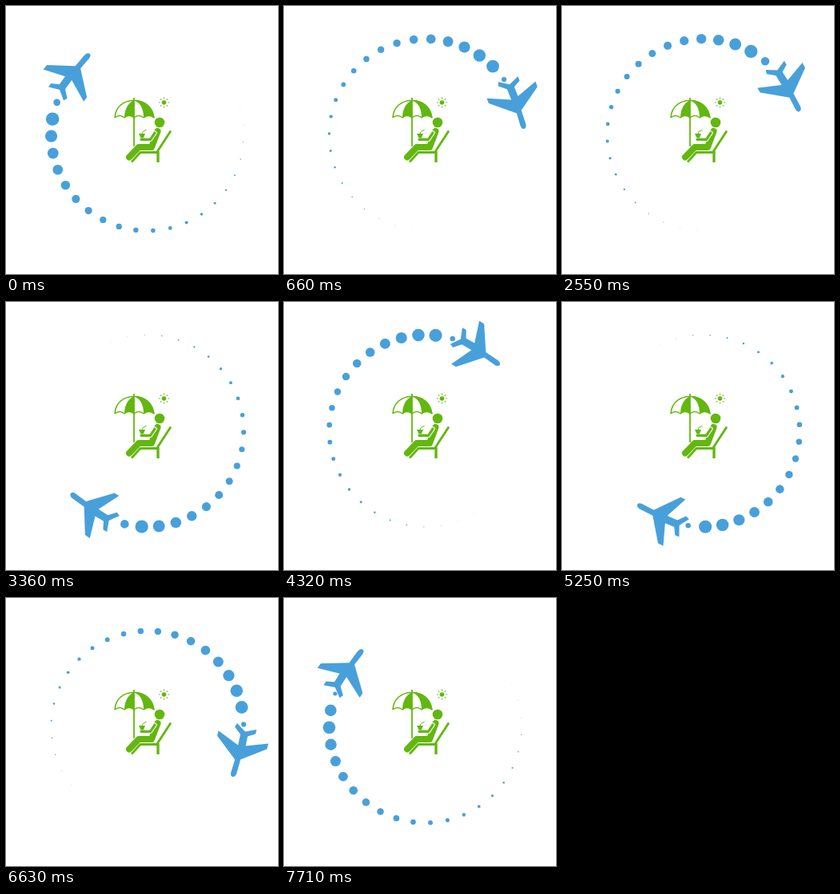
An HTML page with a canvas that plays this animation: 340 by 336 pixels, repeating every 7.74 s.

```html
<!DOCTYPE html>
<html lang="en">
<head>
<meta charset="utf-8">
<title>Holiday flight</title>
<style>
html, body { margin: 0; width: 100%; height: 100%; overflow: hidden; background: #fff; }
canvas { display: block; }
</style>
</head>
<body>
<canvas id="stage" width="340" height="336"></canvas>
<script>
const ctx = document.getElementById('stage').getContext('2d');
const LOOP = 7740, STEP = 30, DOTS = 35, RAD = Math.PI / 180;
const BLUE = '#48a0da', GREEN = '#63b70f';

// Flight progress: time in ms, degrees travelled
const flight = [[0, 0], [1350, 250], [2550, 472], [3120, 581.2], [5250, 976.9],
  [6630, 1236], [7710, 1436.4], [7740, 1440]];

const plane = new Path2D(`M286 203 L281 219 Q280 224 283.5 224.5 Q287 224.5 288.5 219
  L293 203 L326 190 L328 183 L299.5 186 L302 174 L312 171 L313.3 165.5 L299 168
  L289 157.5 L286 162 L293 171.5 L290 185 L265.5 166.5 L264 173 Z`);

function travelled(t) {
  const i = flight.findIndex(p => p[0] > t);
  const [t0, a0] = flight[i - 1], [t1, a1] = flight[i];
  return a0 + (a1 - a0) * (t - t0) / (t1 - t0);
}

function disc(x, y, r, color) {
  ctx.fillStyle = color;
  ctx.beginPath();
  ctx.arc(x, y, r, 0, 7);
  ctx.fill();
}

function line(d, width, color = GREEN, cap = 'butt') {
  ctx.strokeStyle = color;
  ctx.lineWidth = width;
  ctx.lineCap = cap;
  ctx.lineJoin = 'round';
  ctx.stroke(new Path2D(d));
}

function fill(d) {
  ctx.fillStyle = GREEN;
  ctx.fill(new Path2D(d));
}

function drawTrail(t, turn) {
  for (let k = 0; k < DOTS; k++) {
    const angle = 4.35 + (k - 10 * t / LOOP) * 360 / DOTS;
    const lag = (((209.2 + turn - angle) % 360) + 360) % 360;
    const u = (lag - 18) / 265;
    if (u >= 1) continue;
    const r = 8.4 * (u < 0 ? lag / 18 : (1 - u) ** 2.2);
    disc(176.8 + 120.3 * Math.cos(angle * RAD), 161.5 + 120.3 * Math.sin(angle * RAD), r, BLUE);
  }
}

function drawPlane(turn) {
  ctx.save();
  ctx.translate(176.4, 160.9);
  ctx.rotate((turn - 156.2) * RAD);
  ctx.translate(-176.4, -160.9);
  ctx.fillStyle = BLUE;
  ctx.fill(plane);
  ctx.restore();
}

function drawBeach() {
  // Umbrella
  line('M160 115 V176', 1.8);
  line('M136 140 C137 126 147 118.5 160 118.5 C173 118.5 183 126 185 140', 1.6);
  line('M136 140 Q142 135 148 140 Q154 135 160 140 Q166 135 172 140 Q179 135 185 140', 1.5);
  fill('M160 118 C152 122 148 130 148 140 Q154 135 160 140 Z');
  fill('M160 118 C169 122 172 130 172 140 Q179 135 185.5 141 C184 126 173 118 160 118 Z');
  // Sun
  disc(197.5, 121, 2.8, GREEN);
  for (let a = 0; a < 8; a++) {
    const c = Math.cos(a * 45 * RAD), s = Math.sin(a * 45 * RAD);
    line(`M${197.5 + 4.8 * c} ${121 + 4.8 * s} L${197.5 + 6.4 * c} ${121 + 6.4 * s}`, 1.2);
  }
  // Deck chair
  line('M206 156.5 L188.5 183.5 H168 L157 195.5', 2.8);
  line('M190 182 V196', 3.4);
  // Sunbather
  disc(192, 146, 6.3, GREEN);
  line('M189.5 157 L182 177 H166 L154 189.5', 8, GREEN, 'round');
  line('M186 159 L180.5 167.3 H169', 5.4, '#fff', 'round');
  line('M186 159 L180.5 167.3 H169', 3.2, GREEN, 'round');
  // Drink
  fill('M166 160 H174 L171.8 165.5 H168.5 Z');
  line('M170 160 L171.5 157.3 L175.5 155.3', 1);
}

function frame(now) {
  const t = Math.floor((now % LOOP) / STEP) * STEP;
  const turn = travelled(t);
  ctx.fillStyle = '#fff';
  ctx.fillRect(0, 0, 340, 336);
  drawTrail(t, turn);
  drawPlane(turn);
  drawBeach();
}

const start = performance.now();
function tick() {
  frame(performance.now() - start);
  requestAnimationFrame(tick);
}
tick();
</script>
</body>
</html>
```
